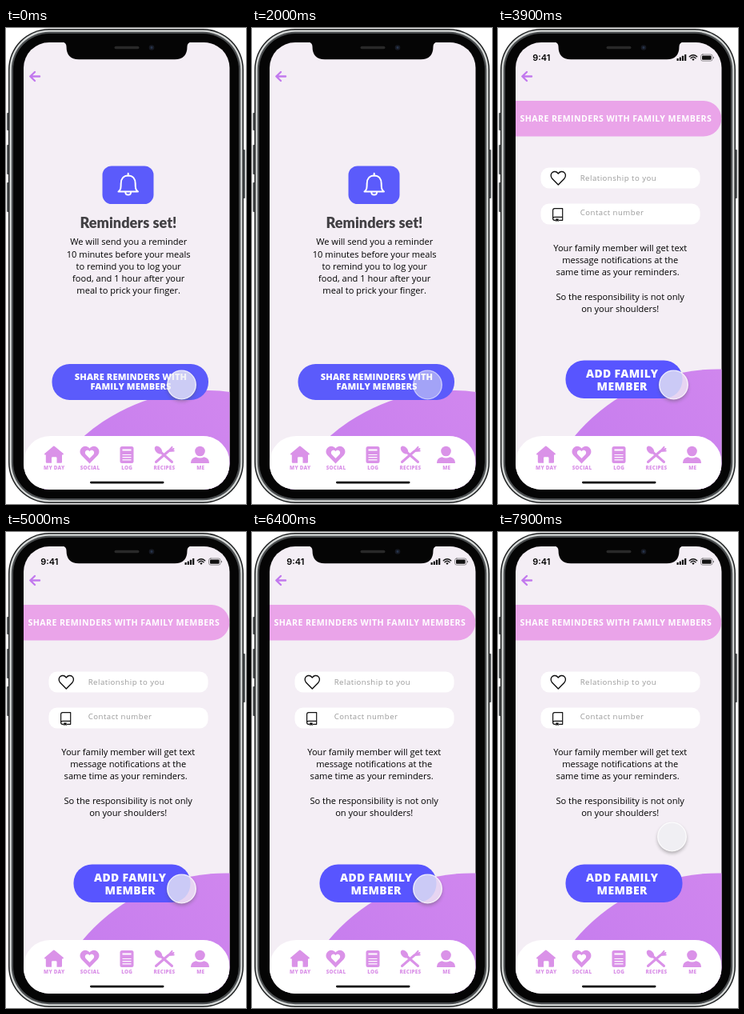
An HTML page that plays this animation: 300 by 595 pixels, repeating every 8000 ms.

```html
<!DOCTYPE html>
<html lang="en">
<head>
<meta charset="utf-8">
<title>Meal reminders</title>
<style>
html, body { margin: 0; width: 100%; height: 100%; overflow: hidden; background: #fff; }
svg { display: block; width: 300px; height: 595px; }
text { font-family: "Open Sans", sans-serif; text-anchor: middle; white-space: pre; }
.body { font-size: 11.1px; fill: #000; }
.head { font: 900 18.1px Lato, sans-serif; fill: #424044; }
.share { font-size: 11.1px; font-weight: 800; letter-spacing: .1px; fill: #fff; }
.add { font-size: 13.9px; font-weight: 800; letter-spacing: .4px; fill: #fff; }
.banner { font-size: 10.6px; font-weight: 700; letter-spacing: .41px; fill: #fff; }
.hint { font-size: 9.6px; letter-spacing: .5px; fill: #999; text-anchor: start; }
.tab { font-size: 6.3px; font-weight: 800; letter-spacing: .25px; fill: #da92e8; }
.clock { font: 600 10.9px Inter, sans-serif; fill: #000; }
.line { fill: none; stroke-linecap: round; stroke-linejoin: round; }
</style>
</head>
<body>
<svg viewBox="0 0 300 595">
  <defs>
    <linearGradient id="hill" x1="0" y1=".7" x2="1" y2="0">
      <stop offset="0" stop-color="#bf76ee"/>
      <stop offset="1" stop-color="#d88eee"/>
    </linearGradient>
    <filter id="soft" x="-50%" y="-50%" width="200%" height="200%">
      <feGaussianBlur stdDeviation="2"/>
    </filter>
    <clipPath id="glass"><rect x="22" y="18" width="257.5" height="559" rx="32"/></clipPath>
    <mask id="outside" maskUnits="userSpaceOnUse" x="-30" y="-30" width="60" height="60">
      <rect x="-30" y="-30" width="60" height="60" fill="#fff"/>
      <circle r="17.8" fill="#000"/>
    </mask>
  </defs>

  <!-- phone shell -->
  <g fill="#55585a">
    <rect x="1" y="106" width="4" height="22" rx="1"/>
    <rect x="1" y="146" width="4" height="37" rx="1"/>
    <rect x="1" y="193" width="4" height="37" rx="1"/>
    <rect x="295" y="152" width="4" height="61" rx="1"/>
  </g>
  <rect x="3" y="1" width="294" height="593" rx="51" fill="#1c1e1f"/>
  <rect x="4.5" y="2.500" width="291" height="590" rx="49.500" fill="#d5d8d7"/>
  <rect x="6.800" y="4.800" width="286.400" height="585.400" rx="47.200" fill="#4a4d4f"/>
  <rect x="9" y="7" width="282" height="581" rx="45" fill="#050505"/>

  <g clip-path="url(#glass)">
    <rect x="22" y="18" width="258" height="560" fill="#f4eef5"/>

    <g id="done">
      <circle cx="250" cy="685" r="232" fill="url(#hill)"/>
      <rect x="120.5" y="172.5" width="64" height="47.5" rx="11.5" fill="#5b5bfb"/>
      <g class="line" stroke="#fff" stroke-width="2">
        <path d="M140.5 204.5C143.5 202.5 143.7 200 143.7 194.5C143.7 188.5 147 184.5 152.7 184.5C158.4 184.5 161.7 188.5 161.7 194.5C161.7 200 161.9 202.5 165 204.5Z"/>
        <path d="M152.7 184.5V181.8M149.3 205C149.3 209.8 156.1 209.8 156.1 205"/>
      </g>
      <text class="head" x="153" y="249.5">Reminders set!</text>
      <g id="doneText"></g>
      <rect x="57.5" y="420" width="195.5" height="45" rx="22" fill="#5b5bfb"/>
      <text class="share" x="156" y="440.3">SHARE REMINDERS WITH</text>
      <text class="share" x="156" y="452.3">FAMILY MEMBERS</text>
    </g>

    <g id="form">
      <circle cx="275" cy="660" r="233.6" fill="url(#hill)"/>
      <path d="M22 91H257A22 22 0 0 1 257 135.5H22Z" fill="#eaa4e9"/>
      <text class="banner" x="147.4" y="117">SHARE REMINDERS WITH FAMILY MEMBERS</text>
      <rect x="53.5" y="174.5" width="199" height="26" rx="10.5" fill="#fff"/>
      <rect x="53.5" y="219.5" width="199" height="26" rx="10.5" fill="#fff"/>
      <path class="line" stroke="#111" stroke-width="1.4" d="M75.3 196L67.7 188.2C62.8 182.5 70.7 175.6 75.3 182C79.9 175.6 87.8 182.5 82.9 188.2Z"/>
      <g class="line" stroke="#111" stroke-width="1.2">
        <path d="M71.5 240.3H70.8Q68.6 240.3 68.6 238V228Q68.6 225.7 70.8 225.7H80.7V240.3H76.5M68.6 238Q68.6 236.3 70.8 236.3H80.7"/>
        <path d="M72.4 238.8V241.8L73.9 240.8L75.4 241.8V238.8Z" fill="#111" stroke-width=".5"/>
      </g>
      <text class="hint" x="102.7" y="191.3">Relationship to you</text>
      <text class="hint" x="102.7" y="234">Contact number</text>
      <g id="formText"></g>
      <rect x="84.5" y="415.5" width="146" height="47.5" rx="23" fill="#5855ff"/>
      <text class="add" x="155.2" y="437.3">ADD FAMILY</text>
      <text class="add" x="155.2" y="452.8">MEMBER</text>

      <text class="clock" x="54.3" y="41">9:41</text>
      <g fill="#111">
        <rect x="223.5" y="38" width="2.2" height="3" rx=".5"/>
        <rect x="226.7" y="36.5" width="2.2" height="4.5" rx=".5"/>
        <rect x="229.9" y="34.8" width="2.2" height="6.2" rx=".5"/>
        <rect x="233.1" y="33" width="2.2" height="8" rx=".5"/>
        <path d="M242.3 39L244 41L245.7 39Q244 37.6 242.3 39Z"/>
        <rect x="255" y="34.5" width="11.6" height="5.2" rx="1"/>
        <path d="M269 35.7Q270.6 37 269 38.4Z"/>
      </g>
      <g class="line" stroke="#111">
        <path d="M239.3 35.8Q244 31.5 248.7 35.8M241 37.7Q244 35 247 37.7" stroke-width="1.4"/>
        <rect x="253.5" y="33" width="14.6" height="8.2" rx="2.4" stroke-width=".7" opacity=".6"/>
      </g>
    </g>

    <path class="line" d="M42 60.5H30.5M36 55L30.3 60.5L36 66" stroke="#c279ee" stroke-width="2.4"/>

    <!-- tab bar -->
    <path d="M22 578V543A33 33 0 0 1 55 510H246.5A33 33 0 0 1 279.5 543V578Z" fill="#fff"/>
    <g fill="#da92e8">
      <path d="M59.8 522.5Q60.5 522.5 61.5 523.4L71.8 532Q72.4 533.3 71 533.5H70V542.5Q70 543.7 68.8 543.7H63.5V537.5Q63.5 536.3 62.3 536.3H58.2Q57 536.3 57 537.5V543.7H51Q49.8 543.7 49.8 542.5V533.5H48.7Q47.4 533.3 48.2 532L58.3 523.4Q59.2 522.5 59.8 522.5Z"/>
      <path d="M104.500 544.500L94.200 534C88.500 527 98.500 518 104.500 525.500C110.500 518 120.500 527 114.800 534Z"/>
      <path d="M104.500 538L99.600 533C97 529.300 101.800 525.700 104.500 529.300C107.200 525.700 112 529.300 109.400 533Z" fill="#fff"/>
      <rect x="142.500" y="523" width="17" height="21" rx="2.500"/>
      <path d="M145.500 527.500H156.500" stroke="#fff" stroke-width="2"/>
      <path d="M145.500 533.500H156.500M145.500 536.700H156.500M145.500 539.900H156.500" stroke="#fff" stroke-width="1.200"/>
      <g class="line" stroke="#da92e8" stroke-width="3">
        <path d="M187.500 542.500L203 529M207.500 542.500L192 529"/>
        <path d="M203 529L207.500 523.800M203 529L209.500 526M203 529L209.700 528.500" stroke-width="2"/>
      </g>
      <ellipse cx="190.500" cy="527.500" rx="3.700" ry="5.800" transform="rotate(-42 190.500 527.500)"/>
      <circle cx="242.500" cy="529" r="6.300"/>
      <path d="M231 544Q231 537.500 237.500 536.300Q242.500 538.700 247.500 536.300Q254 537.500 254 544Z"/>
    </g>
    <g id="tabs"></g>
    <rect x="105" y="566.800" width="92.500" height="2.600" rx="1.300" fill="#111"/>

    <g id="cursor">
      <g mask="url(#outside)">
        <circle id="shade" cy="2.500" r="18" fill="#555" filter="url(#soft)"/>
      </g>
      <circle id="disc" r="17.800" fill="#f0f0f3" stroke="#fff" stroke-width="1.300"/>
    </g>
  </g>

  <!-- notch -->
  <path d="M70 17H232Q226.500 18.500 226.500 23Q226.500 39.300 211 39.300H91Q75.500 39.300 75.500 23Q75.500 18.500 70 17Z" fill="#050505"/>
  <rect x="135.500" y="22.700" width="31" height="3.600" rx="1.800" fill="#292929"/>
  <circle cx="182" cy="24.500" r="3.300" fill="#161922"/>
  <circle cx="182" cy="24.500" r="1.400" fill="#26344c"/>
</svg>

<script>
const $ = id => document.getElementById(id);

function addText(parent, cls, rows) {
  for (const [str, x, y] of rows) {
    const el = document.createElementNS("http://www.w3.org/2000/svg", "text");
    el.setAttribute("class", cls);
    el.setAttribute("x", x);
    el.setAttribute("y", y);
    el.textContent = str;
    $(parent).append(el);
  }
}

addText("doneText", "body", [
  ["We will send you a reminder", 153.2, 271.3],
  ["10 minutes before your meals", 153.2, 286.5],
  ["to remind you to log your", 153.2, 301.7],
  ["food, and 1 hour after your", 153.2, 316.8],
  ["meal to prick your finger.", 153.2, 332]
]);
addText("formText", "body", [
  ["Your family member will get text", 152.7, 279],
  ["message notifications at the", 152.7, 294.2],
  ["same time as your reminders.", 149.7, 309.4],
  ["So the responsibility is not only", 152.7, 339.6],
  ["on your shoulders!", 152.7, 354.8]
]);
addText("tabs", "tab", [
  ["MY DAY", 60.2, 552.3], ["SOCIAL", 105, 552.3], ["LOG", 151.2, 552.3],
  ["RECIPES", 198, 552.3], ["ME", 243.3, 552.3]
]);

const LOOP = 8000, STEP = 100, CUT = 3700;
const MOVE = [7500, 7900];
const part = (t, a, b) => Math.min(1, Math.max(0, (t - a) / (b - a)));
const ease = p => p * p * (3 - 2 * p);

function draw(ms) {
  const t = Math.floor(ms % LOOP / STEP) * STEP;
  const onForm = t >= CUT;
  $("done").style.display = onForm ? "none" : "";
  $("form").style.display = onForm ? "" : "none";

  // pressed: flat and more see-through
  const press = onForm ? 0 : part(t, 0, 200);
  $("disc").setAttribute("fill-opacity", 0.76 - 0.28 * press);
  $("disc").setAttribute("stroke-opacity", 0.85 - 0.25 * press);
  $("shade").setAttribute("opacity", 0.45 * (1 - press));

  const p = ease(part(t, ...MOVE));
  $("cursor").setAttribute("transform", `translate(${219.5 - 2 * p} ${446 - 65 * p})`);
}

const start = performance.now();
function tick(now) {
  draw(Math.max(0, now - start));
  requestAnimationFrame(tick);
}
draw(0);
requestAnimationFrame(tick);
</script>
</body>
</html>
```
